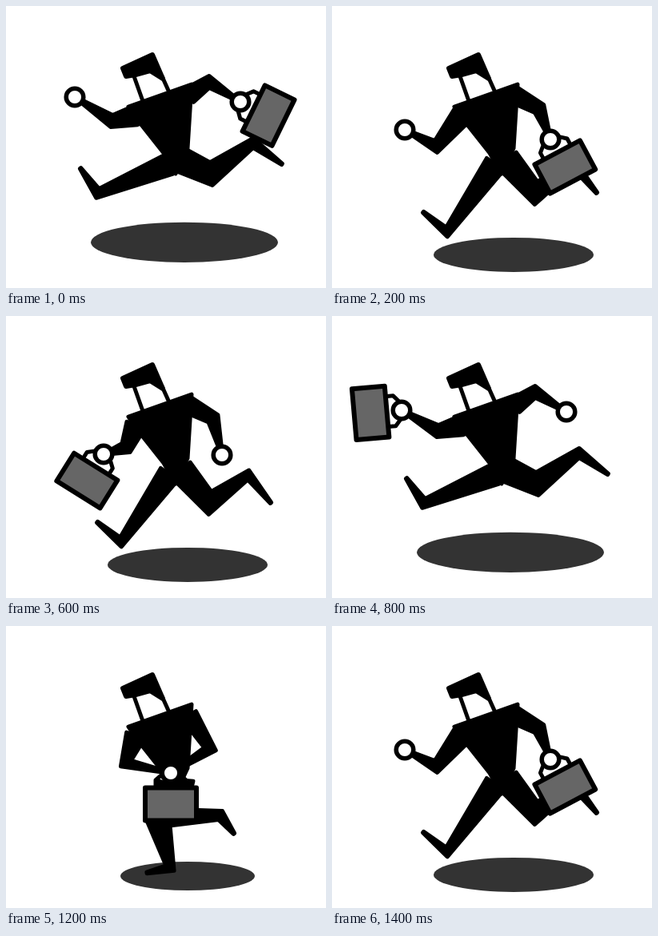
An HTML page with a canvas that plays this animation: 400x353 px, repeating every 1600 ms.

```html
<!DOCTYPE html>
<html lang="en">
<head>
<meta charset="utf-8">
<title>Running man</title>
<style>
html, body { margin: 0; width: 100%; height: 100%; overflow: hidden; background: #fff; }
canvas { display: block; }
</style>
</head>
<body>
<canvas id="stage" width="400" height="353"></canvas>
<script>
const ctx = document.getElementById('stage').getContext('2d');
const STEP = 200;
const GRIP = 39, BAG_W = 64, BAG_H = 41;

// Fixed joints; every limb is a tapered ribbon running from one of them.
const joint = {
  shoulderL: [162, 137], shoulderR: [229, 112],
  hipL: [204, 198], hipR: [219, 193]
};

// Arms are [elbow, hand], legs are [(knee), ankle, toe].
const leap = {
  shadow: [223, 295.8, 117],
  armL: [[132, 144], [86, 114]], armR: [[254, 95], [293, 120]],
  legL: [[114.5, 234.5], [93, 203]], legR: [[256.5, 210], [309, 171.5], [345, 198]]
};
const stride = {
  shadow: [227, 311.4, 100],
  armL: [[130, 176], [91, 155]], armR: [[259, 128.5], [270, 174]],
  legL: [[143.5, 283], [114, 258]], legR: [[255, 234], [303, 199], [331, 234]]
};
const passing = {
  shadow: [227, 313, 84],
  armL: [[150, 172], [206, 184]], armR: [[255, 154], [206, 184]],
  legL: [[190, 243], [205, 303], [176, 309]], legR: [[215, 240], [268, 237], [285, 260]],
  bag: ['armR', 0]
};

// The bag is carried by one arm and tilted by an angle in degrees.
const poses = [
  { ...leap, bag: ['armR', -64] },
  { ...stride, armR: [stride.armR[0], [273, 167]], bag: ['armR', -28] },
  passing,
  { ...stride, armL: [[150, 165], [122, 173]], bag: ['armL', 32] },
  { ...leap, armL: [leap.armL[0], [87, 118]], bag: ['armL', 85] }
];

function path(points, width, fill) {
  ctx.beginPath();
  points.forEach(p => ctx.lineTo(...p));
  if (fill) {
    ctx.closePath();
    ctx.fillStyle = fill;
    ctx.fill();
  }
  ctx.lineWidth = width;
  ctx.stroke();
}

function normal([ax, ay], [bx, by]) {
  const d = Math.hypot(bx - ax, by - ay);
  return [(by - ay) / d, (ax - bx) / d];
}

// Widens a centre line by a half-width at each joint, along the bisector.
function ribbon(points, halves) {
  const last = points.length - 1;
  const left = [], right = [];
  points.forEach((p, i) => {
    const a = normal(points[Math.max(i - 1, 0)], points[Math.max(i, 1)]);
    const b = normal(points[Math.min(i, last - 1)], points[Math.min(i + 1, last)]);
    const nx = a[0] + b[0], ny = a[1] + b[1];
    const k = halves[i] / Math.hypot(nx, ny);
    left.push([p[0] + nx * k, p[1] + ny * k]);
    right.unshift([p[0] - nx * k, p[1] - ny * k]);
  });
  path([...left, ...right], 5, '#000');
}

const arm = (shoulder, points, half) => ribbon([shoulder, ...points], [half, 7.5, 0.5]);
const leg = (hip, points) =>
  ribbon([hip, ...points], points.length > 2 ? [15, 14.5, 6, 0.8] : [13, 6, 0.8]);

function drawShadow([x, y, r]) {
  ctx.fillStyle = '#333';
  ctx.beginPath();
  ctx.ellipse(x, y, r, r * 0.215, 0, 0, Math.PI * 2);
  ctx.fill();
}

function drawHead() {
  path([[146, 78], [183, 61], [196, 91], [180, 81], [162, 86], [150, 88]], 6, '#000');
  path([[160, 88], [171, 119]], 5);
  path([[195, 88], [204, 108]], 5);
}

function drawBag([x, y], angle) {
  ctx.save();
  ctx.translate(x, y);
  ctx.rotate(angle * Math.PI / 180);
  path([[-19, 19], [-19, 9], [-11, 2], [11, 2], [19, 9], [19, 19]], 5);
  ctx.beginPath();
  ctx.rect(-BAG_W / 2, GRIP - BAG_H / 2, BAG_W, BAG_H);
  ctx.fillStyle = '#666';
  ctx.fill();
  ctx.lineWidth = 6;
  ctx.stroke();
  ctx.restore();
}

function drawHand([x, y]) {
  ctx.beginPath();
  ctx.arc(x, y, 10.8, 0, Math.PI * 2);
  ctx.fillStyle = '#fff';
  ctx.fill();
  ctx.lineWidth = 5.5;
  ctx.stroke();
}

function draw(pose) {
  ctx.fillStyle = '#fff';
  ctx.fillRect(0, 0, 400, 353);
  ctx.lineJoin = ctx.lineCap = 'round';
  ctx.strokeStyle = '#000';

  drawShadow(pose.shadow);
  drawHead();
  path([[153, 126], [232, 98], [227, 178], [212, 210], [197, 184], [165, 143.5]], 5, '#000');
  leg(joint.hipL, pose.legL);
  leg(joint.hipR, pose.legR);
  arm(joint.shoulderL, pose.armL, 12);
  arm(joint.shoulderR, pose.armR, 10);

  const [side, angle] = pose.bag;
  drawBag(pose[side][1], angle);
  drawHand(pose.armL[1]);
  drawHand(pose.armR[1]);
}

const start = performance.now();
function tick() {
  const n = Math.floor((performance.now() - start) / STEP) % 8;
  draw(poses[4 - Math.abs(4 - n)]); // back and forth through the poses
  requestAnimationFrame(tick);
}
tick();
</script>
</body>
</html>
```
